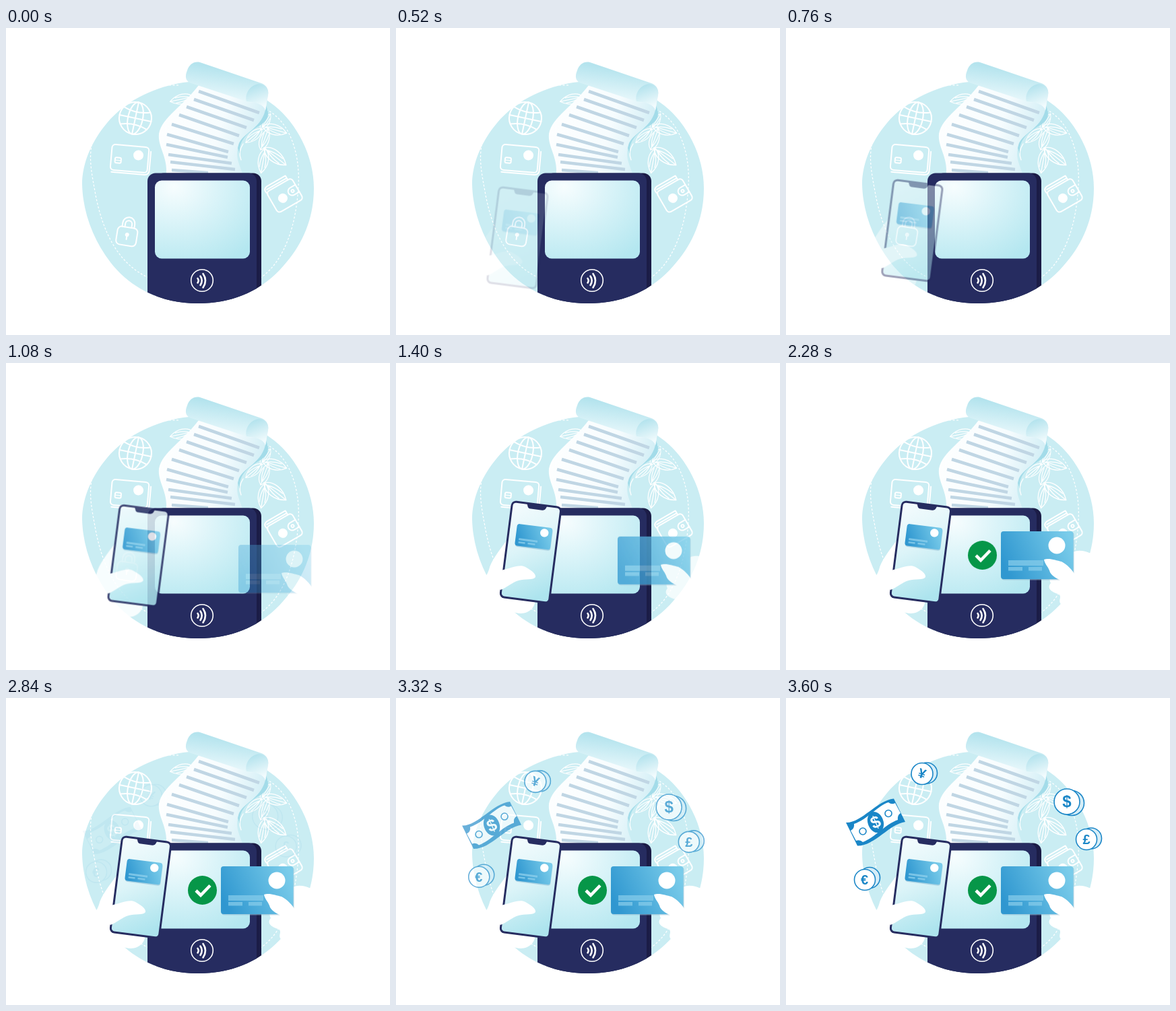
An HTML page without scripts that plays this animation: 570x456 px, repeating every 8 s.

```html
<!DOCTYPE html>
<html lang="en">
<head>
<meta charset="utf-8">
<title>Card terminal</title>
<style>
  html, body { margin: 0; width: 100%; height: 100%; overflow: hidden; background: #fff; }
  svg { display: block; width: 100%; height: 100%; }

  .phone, .card, .check, .money > g { animation: 8s linear infinite both; }
  .phone { --from: translate(-23px, 36px); animation-name: phone; }
  .card { --from: translate(40px, 31px); animation-name: card; }
  .check { animation-name: check; transform-origin: 291.5px 285.5px; }
  .money > g { animation-name: money; }

  @keyframes phone {
    0%, 5% { opacity: 0; transform: var(--from); }
    15%, 100% { opacity: 1; transform: none; }
  }
  @keyframes card {
    0%, 10% { opacity: 0; transform: var(--from); }
    20%, 100% { opacity: 1; transform: none; }
  }
  @keyframes check {
    0% { opacity: 0; transform: scale(0); }
    20% { opacity: 0; transform: scale(0); animation-timing-function: cubic-bezier(.16, 1, .3, 1); }
    30%, 100% { opacity: 1; transform: none; }
  }
  @keyframes money {
    0%, 35% { opacity: 0; transform: var(--from); }
    45%, 100% { opacity: 1; transform: none; }
  }

  .line { fill: none; stroke: #fff; stroke-width: 2; stroke-linecap: round; stroke-linejoin: round; }
  .thin { stroke-width: 1.3; }
  .dash { fill: none; stroke: #fff; stroke-width: 1.2; stroke-dasharray: 3 2.5; }
  .dot { fill: #fff; stroke: none; }
  .coin { fill: #fff; stroke: #1a86c7; stroke-width: 1.6; }
  .back { fill: #d5edf7; }
  .sign { fill: #1a86c7; font: bold 20px "Liberation Sans", Arial, sans-serif; text-anchor: middle; }
</style>
</head>
<body>
<svg viewBox="0 0 570 456">
  <defs>
    <path id="blob" d="M290 79C240 79 183 101 150 141C128 167 113 200 113 232C114 275 130 315 155 348C186 388 232 409 285 409C340 409 382 388 412 353C442 320 457 280 457 238C457 190 432 142 398 115C368 91 330 79 290 79Z"/>
    <clipPath id="inBlob"><use href="#blob"/></clipPath>
    <g id="leaf">
      <path d="M0 0C8-10 25-10 37 0C25 10 8 10 0 0Z"/>
      <path d="M0 0H37M5 0Q16-5 28-4M5 0Q16 5 28 4"/>
    </g>
    <linearGradient id="paper" x1="0" y1="0" x2="1" y2=".25">
      <stop offset="0" stop-color="#fff"/>
      <stop offset=".65" stop-color="#f6fcfe"/>
      <stop offset="1" stop-color="#d4eff6"/>
    </linearGradient>
    <linearGradient id="roll" x1=".55" y1=".15" x2=".4" y2=".8">
      <stop offset="0" stop-color="#b5e4ee"/>
      <stop offset="1" stop-color="#ebf9fc"/>
    </linearGradient>
    <linearGradient id="curl" x1="0" y1="0" x2=".3" y2="1">
      <stop offset="0" stop-color="#a9dfeb"/>
      <stop offset="1" stop-color="#f2fbfd"/>
    </linearGradient>
    <radialGradient id="screen" cx=".2" cy=".08" r="1.1">
      <stop offset="0" stop-color="#f7fdfe"/>
      <stop offset=".45" stop-color="#d8f3f8"/>
      <stop offset="1" stop-color="#b4e7f0"/>
    </radialGradient>
    <linearGradient id="glass" x1=".3" y1="0" x2=".6" y2="1">
      <stop offset="0" stop-color="#f2fbfd"/>
      <stop offset=".45" stop-color="#dcf4f8"/>
      <stop offset="1" stop-color="#ade4ee"/>
    </linearGradient>
    <linearGradient id="blue" x1="0" y1=".6" x2="1" y2=".3">
      <stop offset="0" stop-color="#2f97d0"/>
      <stop offset="1" stop-color="#7accea"/>
    </linearGradient>
  </defs>

  <use href="#blob" fill="#caedf3"/>

  <g class="dash">
    <path d="M256 85C190 82 140 115 128 170C122 195 128 220 133 248C143 300 165 350 212 371"/>
    <path d="M386 121C420 137 437 185 434 235C431 290 415 345 378 371"/>
  </g>

  <g class="line">
    <g transform="rotate(12 192 134)">
      <circle cx="192" cy="134" r="24"/>
      <ellipse cx="192" cy="134" rx="11" ry="24"/>
      <path d="M192 110V158M168 134H216M172 121Q192 128 212 121M172 147Q192 140 212 147"/>
    </g>
    <g transform="rotate(5 184 195)">
      <rect x="156" y="175" width="55" height="38" rx="5"/>
      <path d="M158 216H207Q214 216 214 209V181"/>
      <rect x="162" y="194" width="9" height="8" rx="2"/>
      <path class="thin" d="M162 198H171"/>
      <circle class="dot" cx="196" cy="188" r="7.5"/>
    </g>
    <g transform="rotate(9 180 305)">
      <rect x="165" y="296" width="30" height="27" rx="6"/>
      <path d="M171 296V290A9 9 0 0 1 189 290V296M175 296V291A5 5 0 0 1 185 291V296"/>
      <circle class="dot" cx="180" cy="307" r="3"/>
      <path d="M180 307V314"/>
    </g>
    <g transform="rotate(-30 411 247)">
      <rect x="391" y="232" width="43" height="36" rx="5"/>
      <path d="M392 235Q388 226 396 225H428V232M394 229H428"/>
      <path d="M434 244H425A6 6 0 0 0 425 256H434"/>
      <circle cx="426" cy="250" r="2"/>
      <circle class="dot" cx="408" cy="252" r="7"/>
    </g>
    <g class="thin">
      <use href="#leaf" transform="translate(381 146) rotate(16)"/>
      <use href="#leaf" transform="translate(378 151) rotate(-58) scale(.75)"/>
      <use href="#leaf" transform="translate(380 150) rotate(140) scale(.85)"/>
      <use href="#leaf" transform="translate(383 178) rotate(38) scale(1.12)"/>
      <use href="#leaf" transform="translate(385 179) rotate(100)"/>
      <use href="#leaf" transform="translate(378 181) rotate(-70) scale(.9)"/>
      <use href="#leaf" transform="translate(278 102) rotate(168) scale(.95)"/>
      <path d="M349 196Q344 184 352 172"/>
    </g>
  </g>

  <g class="money">
    <g style="--from:translate(14px,34px)">
      <circle class="coin back" cx="209" cy="111.500" r="15.500"/>
      <circle class="coin" cx="202" cy="112.500" r="16"/>
      <text class="sign" x="202" y="119" font-size="18" transform="rotate(18 202 112)">¥</text>
    </g>
    <g style="--from:translate(-34px,23px)">
      <circle class="coin back" cx="424" cy="156" r="18.500"/>
      <circle class="coin" cx="417" cy="154" r="19"/>
      <text class="sign" x="417" y="162" style="font-size:24px">$</text>
    </g>
    <g style="--from:translate(-32px,11px)">
      <circle class="coin back" cx="453" cy="208.500" r="15.500"/>
      <circle class="coin" cx="446" cy="210" r="15.500"/>
      <text class="sign" x="446" y="217">£</text>
    </g>
    <g style="--from:translate(18px,-12px)">
      <circle class="coin back" cx="124" cy="267" r="15.500"/>
      <circle class="coin" cx="117" cy="270" r="15.500"/>
      <text class="sign" x="116.500" y="277">€</text>
    </g>
    <g style="--from:translate(26px,13px)">
      <path d="M89 185C112 186 135 152 160 149.500L177 184C153 187 132 220 106 219.500Z" fill="#1a86c7"/>
      <path d="M101 187C120 181 136 160 152 155Q157 159 162 156L170 171Q165 174 166 181C148 187 131 208 114 214Q110 210 104 212L96 197Q102 194 101 187Z" fill="#fff"/>
      <ellipse cx="133" cy="184.500" rx="11.500" ry="16" fill="#1a86c7" transform="rotate(-20 133 184.500)"/>
      <text class="sign" x="133" y="193" style="fill:#fff;font-size:25px" transform="rotate(-24 133 184.500)">$</text>
      <circle class="coin" cx="114" cy="198" r="5" stroke-width="2"/>
      <circle class="coin" cx="152" cy="171.500" r="5" stroke-width="2"/>
    </g>
  </g>

  <!-- receipt -->
  <path d="M386 116C392 128 389 137 378 144C354 158 346 168 347 187L341 170L362 135Z" fill="#a3dce9"/>
  <path d="M286 85C262 117 232 132 227 157C225 177 240 190 238 218H352C346 201 340 192 345 174C350 155 382 150 386 116Z" fill="url(#paper)"/>
  <path d="M286 94L376 126M279 106L368 137M268 117L357 148M257 129L346 160M246 143L338 172M239 158L330 184M238 173L329 192M241 188L335 201M244 199L340 210M246 211L300 215" stroke="#c0d6e4" stroke-width="4.600"/>
  <path d="M288 51L379 82C387 85 390 91 389 99L385 122C383 114 375 110 362 111L357 109L275 82C265 79 266 70 269 63C272 54 279 49 288 51Z" fill="url(#roll)"/>
  <path d="M357 109C354 98 362 84 376 83C386 84 391 92 389 100L385 122C382 113 372 111 357 109Z" fill="url(#curl)"/>

  <!-- terminal -->
  <g clip-path="url(#inBlob)">
    <rect x="222" y="215.500" width="157" height="220" rx="12" fill="#1b1c46"/>
    <rect x="210" y="215.500" width="162" height="220" rx="12" fill="#262c60"/>
  </g>
  <rect x="221" y="226.500" width="141" height="116" rx="10" fill="url(#screen)"/>
  <g class="line">
    <circle cx="291" cy="375" r="16.300" stroke-width="1.600" style="stroke-width:1.6"/>
    <path style="stroke-width:2.6" d="M284.500 372Q287 375 284.500 378.500M288.500 368.500Q293 375 288.500 382M292.500 365Q299.500 375 292.500 385.500"/>
  </g>

  <g class="check">
    <circle cx="291.500" cy="285.500" r="21.500" fill="#069648"/>
    <path d="M282 286L289 293L303 278.500" fill="none" stroke="#fff" stroke-width="4.600"/>
  </g>

  <g class="card">
    <path d="M424 282C438 273 455 284 478 294L484 372C445 392 425 370 408 358C403 352 411 347 404 343C393 340 387 334 393 327C391 322 390 318 394 314Z" fill="#fff"/>
    <rect x="320" y="251.500" width="107.500" height="71" rx="4" fill="#8fbcd4" opacity=".6"/>
    <rect x="319" y="250" width="107.500" height="71" rx="4" fill="url(#blue)"/>
    <path d="M330 293H382V301H330ZM330 303H351V308.500H330ZM360 303H380V308.500H360Z" fill="#85cbea" opacity=".75"/>
    <circle class="dot" cx="402" cy="271" r="12.500"/>
    <path d="M383 292C390 289 401 293 409 295C417 299 425 307 430 316L432 325H410C403 320 395 317 392 311C390 303 384 299 383 292Z" fill="#fff"/>
  </g>

  <g class="phone">
    <path d="M167 260C152 280 141 294 138 307C134 320 120 334 98 350L126 388C146 376 160 366 178 371C195 375 207 365 207 350L180 290Z" fill="#fff"/>
    <g transform="rotate(7.300 200 280.500)">
      <rect x="163.500" y="209.500" width="73" height="143" rx="6" fill="url(#glass)" stroke="#262c60" stroke-width="3"/>
      <path d="M185 209H216L214 214Q213 217 209 217H192Q188 217 187 214Z" fill="#262c60"/>
      <rect x="175.500" y="243" width="53" height="32.500" rx="4" fill="#7fb3d0" opacity=".5"/>
      <rect x="175" y="241.500" width="53" height="32.500" rx="4" fill="url(#blue)"/>
      <path d="M180 262.500H208V265.500H180ZM180 267.500H190V270H180ZM194 267.500H205V270H194Z" fill="#8fd0ec" opacity=".75"/>
      <circle class="dot" cx="216.500" cy="250" r="6.200"/>
    </g>
    <path d="M156 308C170 305 184 298 192 303C199 307 208 312 207 318C204 323 191 320 182 323C172 326 164 334 155 337L146 330Z" fill="#fff"/>
  </g>
</svg>
</body>
</html>
```
